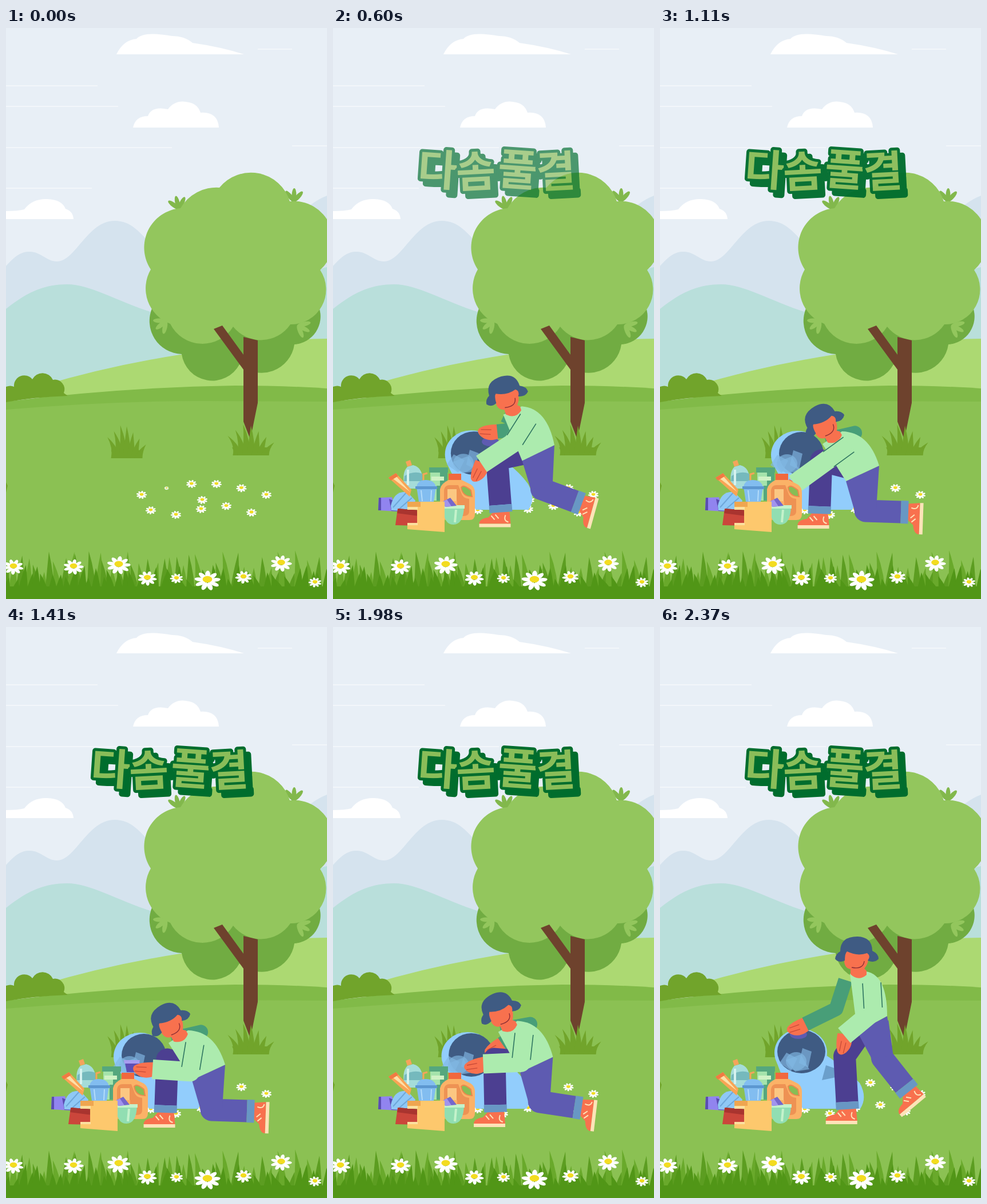
Animation, 561 px wide and 998 px high, one loop 2.4 s. Source, as an HTML page:

```html
<!DOCTYPE html>
<html lang="ko">
<head>
<meta charset="utf-8">
<style>
html, body { margin: 0; width: 100%; height: 100%; overflow: hidden; }
svg { display: block; width: 100vw; height: 100vh; }
text { font: 700 75px "Noto Sans CJK KR", "Noto Sans CJK", sans-serif; text-anchor: middle; }
</style>
</head>
<body>
<svg viewBox="0 0 561 998" preserveAspectRatio="none">
  <rect width="561" height="998" fill="#e8eff6"/>
  <path d="M0 101H160M0 137H196M0 209H290M500 206H561M440 37H500M0 280H150" stroke="#f2f6fa" stroke-width="2"/>
  <g fill="#fff">
    <path d="M193 46Q205 21 228 19Q240 5 290 14Q312 14 326 26Q375 33 416 46Z"/>
    <path d="M222 174Q226 154 248 154Q254 136 283 142Q296 124 320 130Q335 133 340 148Q370 146 372 174Z"/>
    <path d="M0 320Q22 320 32 317Q46 298 72 299Q98 300 104 316Q117 320 118 334H0Z"/>
  </g>
  <path d="M0 416C18 396 28 391 41 391C62 391 70 408 89 408C122 408 142 337 190 337C226 337 240 368 275 400L500 340Q530 305 561 293V640H0Z" fill="#d5e3ee"/>
  <path d="M0 491C40 459 70 448 107 448C150 448 200 482 275 503L520 460Q540 420 561 418V640H0Z" fill="#b9dfdb"/>
  <path d="M60 626Q180 590 310 570Q460 543 561 543V660H60Z" fill="#acd972"/>
  <path d="M0 653Q200 628 400 625Q490 625 561 630V680H0Z" fill="#81ba48"/>
  <path d="M0 667Q180 652 340 652L561 653V998H0Z" fill="#8bc153"/>
  <path d="M0 627Q8 624 14 627A18 18 0 0 1 46 614A20 20 0 0 1 82 615A17 17 0 0 1 101 638L108 643Q50 645 0 654Z" fill="#71a42b"/>
  <path d="M256 488A58 58 0 0 0 307 570A54 54 0 0 0 408 588A58 58 0 0 0 504 553A49 49 0 0 0 547 488Z" fill="#71ac42"/>
  <g id="twigs"></g>
  <path d="M253 422A69 69 0 0 1 305 315A72 72 0 0 1 373 279A71 71 0 0 1 496 303A69 69 0 0 1 549 423A61 61 0 0 1 497 518A62 62 0 0 1 397 522A63 63 0 0 1 287 517A66 66 0 0 1 253 422Z" fill="#93c65d"/>
  <path d="M415 540L440 546V655L427 719L415 688V597L363 526L378 520L415 571Z" fill="#6e422d"/>
  <g id="meadow"></g>
  <g id="person"></g>
  <g id="pile">
    <path d="M80 821L103 820L112 845L79 843Z" fill="#9184ef"/><path d="M80 821L84 821V843L79 843ZM98 823L120 832V845L102 844Z" fill="#5a4db0"/>
    <path d="M101 835Q107 808 130 811L144 826L138 845L102 843Z" fill="#8fc8f6"/><path d="M105 838L128 812M114 842L138 821" stroke="#6ea7d9" stroke-width="2"/>
    <path d="M127 758L135 755L138 764L130 767Z" fill="#f5a45b"/>
    <path d="M130 767L140 764Q155 768 156 785V805H126Q119 778 130 767Z" fill="#a5dcd9"/><path d="M125 783Q141 773 156 779V792H124Z" fill="#75b9bd"/><path d="M131 772V799" stroke="#d6f2ef" stroke-width="4"/>
    <path d="M97 786L110 778L137 807L134 819Z" fill="#f9a455"/><path d="M104 787L110 783L135 811Z" fill="#fde0a8"/><path d="M97 786L110 778L114 783L101 791Z" fill="#f07a43"/>
    <path d="M170 776H199V826H170Z" fill="#a5e3ab"/><path d="M168 768H201V777H168ZM187 777H200V826H181V800H187Z" fill="#55a77e"/><path d="M172 784H194V791H172Z" fill="#d0f2c5"/>
    <path d="M158 792V780L165 778" fill="none" stroke="#f5a45b" stroke-width="3"/>
    <path d="M146 802Q148 790 162 790Q177 790 180 802L176 828H150Z" fill="#82bdf0"/><path d="M144 801H182V806H144Z" fill="#5c97d1"/><path d="M154 808L156 827M172 808L171 827" stroke="#b4dcfa" stroke-width="2"/>
    <path d="M202 779H224V792H202Z" fill="#f1683e"/>
    <path d="M202 790H225L241 798Q248 803 248 812V850Q248 860 238 860H197Q187 858 187 848V806Q189 796 202 790Z" fill="#fbb267"/>
    <path d="M194 808Q195 799 204 799H219L224 812Q226 822 238 823V846Q237 853 228 853H217V827H194Z" fill="#ee9254"/><path d="M200 806H216V827H200Z" fill="#fbc782"/>
    <path d="M224 803Q228 797 241 808L243 819Q226 819 224 803Z" fill="#88bd55" stroke="#ed8850" stroke-width="2"/>
    <path d="M192 836H229Q228 868 210 868Q193 868 192 836Z" fill="#91deb2"/><path d="M190 834H230V840H190Z" fill="#c4f2cb"/><path d="M215 842L213 864" stroke="#c4f2cb" stroke-width="4"/>
    <path d="M193 827L205 821L216 835L196 837Z" fill="#7567cc"/><path d="M193 827L199 824L207 836L196 837Z" fill="#a194ed"/>
    <path d="M113 840L150 843V870L109 869Z" fill="#cb463b"/><path d="M114 840L150 843V853L112 848Z" fill="#a9342f"/>
    <path d="M130 828H195V881L130 876V867H147V837H130Z" fill="#fdc86d"/><path d="M130 837H148V842H130ZM130 865H148V869H130Z" fill="#fbe09f"/><path d="M130 828H153V837H130Z" fill="#efa650"/>
  </g>
  <g id="title" opacity="0"></g>
</svg>
<script>
const $ = id => document.getElementById(id);
const repeat = (n, make) => Array.from({ length: n }, (_, i) => make(i)).join('');
const lerp = (a, b, u) => a + (b - a) * u;
const smooth = (from, to, t) => {
  const u = Math.min(1, Math.max(0, (t - from) / (to - from)));
  return u * u * (3 - 2 * u);
};
let seed = 7;
const rnd = (min, max) => lerp(min, max, (seed = seed * 16807 % 2147483647) / 2147483647);

const path = (d, fill) => `<path d="${d}" fill="${fill}"/>`;
const line = (d, color, width) =>
  `<path d="${d}" fill="none" stroke="${color}" stroke-width="${width}" stroke-linejoin="round"/>`;
const ellipse = (x, y, rx, ry, fill, turn = 0) =>
  `<ellipse cx="${x}" cy="${y}" rx="${rx}" ry="${ry}" fill="${fill}" transform="rotate(${turn})"/>`;
const at = (x, y, angle, body) => `<g transform="translate(${x} ${y}) rotate(${angle})">${body}</g>`;

// ---- plants ----
const blade = (x, y, w, lean, h, fill) =>
  path(`M${x - w} ${y}Q${x - w / 2} ${y - h / 2} ${x + lean} ${y - h}Q${x + w} ${y - h / 2} ${x + w} ${y}Z`, fill);

const daisy = (x, y, r) => `<g transform="translate(${x} ${y}) scale(1 .76)">` +
  repeat(9, i => ellipse(r * .62, 0, r * .42, r * .2, '#fff', i * 40 + x)) +
  ellipse(0, -r * .15, r * .38, r * .34, '#f3dc20') + '</g>';

const sprig = (x, y, angle, fill) => at(x, y, angle, repeat(3, i => ellipse(0, -11, 4, 12, fill, i * 40 - 48)));

const tuft = (x, y, half, tall) =>
  path(`M${x - half * .65} ${y}L${x - half * .8} ${y - 14}H${x + half * .8}L${x + half * .65} ${y}Z`, '#71a42b') +
  repeat(7, i => blade(x + (i - 3) * half * .2, y, 7, (i - 3) * half * .13, tall * (1 - Math.abs(i - 2.4) * .17), '#71a42b'));

$('twigs').innerHTML = sprig(302, 316, -5, '#82b84c') + sprig(503, 303, 10, '#82b84c') +
  sprig(280, 512, -120, '#93c65d') + sprig(510, 520, 125, '#93c65d');

const border = [[13, 942, 17], [118, 942, 17], [197, 939, 20], [247, 962, 16], [298, 962, 11],
  [352, 966, 22], [415, 960, 14], [481, 936, 18], [540, 969, 11]];
$('meadow').innerHTML =
  tuft(211, 752, 34, 62) + tuft(428, 747, 41, 58) + path('M0 794L3 800L0 812Z', '#71a42b') +
  repeat(6, i => daisy(237 + i * 43.6, 816 - 20 * Math.sin(i * Math.PI / 5), i === 1 ? 4 : 9)) +
  repeat(5, i => daisy(253 + i * 44, 843 + 8 * Math.sin(i * 1.7), 9)) + daisy(343, 825, 9) +
  repeat(46, i => blade(i * 12.4 + rnd(-3, 3), 998, 9, rnd(-9, 9), rnd(45, 86), i % 2 ? '#69a92b' : '#5c9d21')) +
  repeat(44, i => blade(i * 13 + rnd(-3, 3), 998, 10, rnd(-9, 9), rnd(34, 60), '#519617')) +
  path('M0 976H561V998H0Z', '#519617') +
  border.map(f => daisy(...f)).join('');

// ---- title ----
const word = (shift, fill) => repeat(4, i =>
  at(181 + i * 70 + shift, 277 + (i % 2 ? 1 : -2) + shift, i % 2 ? -3 : 4,
    `<text fill="${fill}" stroke="#006d2d" stroke-width="10" stroke-linejoin="round" paint-order="stroke">${'다솜풀결'[i]}</text>`));
$('title').innerHTML = word(9, '#006d2d') + word(0, '#8abd59');

// ---- person: each joint is [standing x, y, kneeling x, y] ----
const joints = {
  head: [345, 580, 290, 695],
  collarFront: [332, 606, 284, 727], collarBack: [360, 602, 318, 705],
  waistFront: [345, 708, 325, 792], waistBack: [397, 680, 383, 765], shoulderBack: [397, 608, 365, 706],
  nearShoulder: [370, 622, 330, 728], farShoulder: [324, 617, 289, 720],
  farHip: [354, 705, 335, 770], farAnkle: [327, 830, 279, 836],
  nearHip: [380, 690, 356, 780], nearAnkle: [427, 802, 421, 846],
  mouth: [246, 744, 240, 746]
};
const SKIN = '#f8714e', HAIR = '#3f5b83', SHIRT = '#acebae', SLEEVE = '#489e78', NEAR = '#5e5bb1', FAR = '#4c3f91';
const degrees = ([ax, ay], [bx, by]) => Math.atan2(by - ay, bx - ax) * 180 / Math.PI;
const poly = (...points) => 'M' + points.join('L');

// Middle joint of a two-bone limb; side picks the bend.
function bend([ax, ay], [bx, by], upper, lower, side) {
  const dx = bx - ax, dy = by - ay, d = Math.hypot(dx, dy);
  const along = d < upper + lower ? (upper * upper - lower * lower + d * d) / (2 * d) : d * upper / (upper + lower);
  const out = side * Math.sqrt(Math.max(0, upper * upper - along * along));
  return [ax + (dx * along + dy * out) / d, ay + (dy * along - dx * out) / d];
}

const hand = path('M-3-12Q17-18 29-6Q38 4 30 9Q20 14-3 12Z', SKIN) + line('M10 4L28 6M12-4L31-1', '#c74a38', 1.3);
const shoe = path('M-13-1H15L17 20H-38Q-38 11-22 9Z', SKIN) + path('M-38 20H17V26H-38Z', '#fde3b8') +
  line('M-17 6L-11 13M-10 4L-4 11M8 5Q4 15 13 17', '#fde3b8', 2);
const head = path('M-23-13H20Q28-14 27-6Q25 2 19 2Q18 10 12 17L16 21V28Q2 40-12 27V18Q-24 16-23 0Z', SKIN) +
  path('M-39 0Q-38-9-30-13Q-30-39 0-39Q26-38 26-14Q37-9 37 0Q30 8 18 3Q24-5 17-10Q0-4-18-13Q-22-10-22 3Q-33 8-39 0Z', HAIR) +
  line('M-10 15Q10 19 12 4', '#8d2f35', 1.4);

function leg(hip, knee, ankle, turn, color) {
  const len = Math.hypot(ankle[0] - knee[0], ankle[1] - knee[1]);
  const cuff = ankle.map((v, i) => v + (v - knee[i]) / len * 13);
  return at(...cuff, turn, shoe) + line(poly(hip, knee, ankle), color, 39) + line(poly(ankle, cuff), '#6897c4', 40);
}

function bag([x, y], crouch) {
  const glass = 'rgba(130,185,228,.65)', right = 358 - 14 * crouch;
  return path(`M${x - 42} ${y + 17}L222 808L250 842H${right - 8}Q${right + 5} 822 ${right - 9} 797Q318 765 ${x + 37} ${y}Z`, '#92cdfc') +
    path(`M283 792L290 766L${right - 50} 772L${right - 46} 786Z`, '#6b9fcb') +
    ellipse(x, y, 46, 42, '#92cdfc') + ellipse(x + 1 + 6 * crouch, y - 2, 42 - 3 * crouch, 38, HAIR) +
    at(x - 10 * crouch, y, 0, path('M-37 18L-25 0L-6 10L-17 32Z', glass) + ellipse(-8, 15, 18, 16, glass) +
      path('M3-8L19-2L13 26L-3 18Z', glass) + path('M-26 13L0 3L15 29L-10 33Z', glass));
}

function person(t) {
  const crouch = smooth(320, 830, t) - smooth(1858, 2345, t);
  const carry = smooth(1110, 1400, t);
  const swing = crouch ** .6; // sideways motion leads the drop
  const place = ([x0, y0, x1, y1]) => [lerp(x0, x1, swing), lerp(y0, y1, crouch)];
  const p = {};
  for (const name in joints) p[name] = place(joints[name]);

  const wrist = place([322, 714, lerp(235, 256, carry), lerp(797, 773, carry)]);
  const grip = [lerp(254, 300, swing), lerp(694, 752, crouch ** 3)];
  const elbow = bend(p.nearShoulder, wrist, 50, 66, 1);
  const farElbow = bend(p.farShoulder, grip, 53, 60, 1);
  const knee = bend(p.nearHip, p.nearAnkle, 64, 62, -1);
  const farKnee = bend(p.farHip, p.farAnkle, 55, 80, -1);

  const cup = t > 1130 && t < 1680
    ? at(wrist[0] - 36, wrist[1] - 6, 0, path('M-13-10H14L9 11H-9Z', '#5d4fb5') + path('M-14-10H14L13-4H-13Z', '#a79cf0')) : '';
  const seams = at(...p.nearShoulder, degrees(p.nearShoulder, elbow), line('M0-16H44M0 16H44', '#2f7561', 1.6));

  return bag([p.mouth[0] - 6 * carry * crouch, p.mouth[1] + 5 * carry * crouch], crouch) +
    ellipse(grip[0] - 12, grip[1] + 18, 15, 8, NEAR) +
    at(...grip, degrees(farElbow, grip), hand) + line(poly(p.farShoulder, farElbow, grip), SLEEVE, 25) +
    leg(p.farHip, farKnee, p.farAnkle, 0, FAR) + leg(p.nearHip, knee, p.nearAnkle, -40 - 48 * swing, NEAR) +
    path(poly(p.waistFront, p.waistBack, [knee[0] + 19, knee[1] - 4], [knee[0] - 19, knee[1]]), NEAR) +
    path(`${poly(p.collarFront, p.waistFront, p.waistBack)}Q${p.shoulderBack} ${p.collarBack}Z`, SHIRT) +
    at(...p.head, -30 * crouch, head) + cup +
    at(...wrist, lerp(95, lerp(120, 176, carry), crouch), hand) +
    line(poly(p.nearShoulder, elbow, wrist), SHIRT, 34) + seams;
}

function draw(now) {
  const t = now % 2400, shown = t >= 30;
  $('person').innerHTML = shown ? person(t) : '';
  $('pile').setAttribute('visibility', shown ? 'visible' : 'hidden');
  $('title').setAttribute('opacity', 1 - Math.max(0, 1 - t / 1400) ** 2);
  requestAnimationFrame(draw);
}
draw(0);
</script>
</body>
</html>
```
